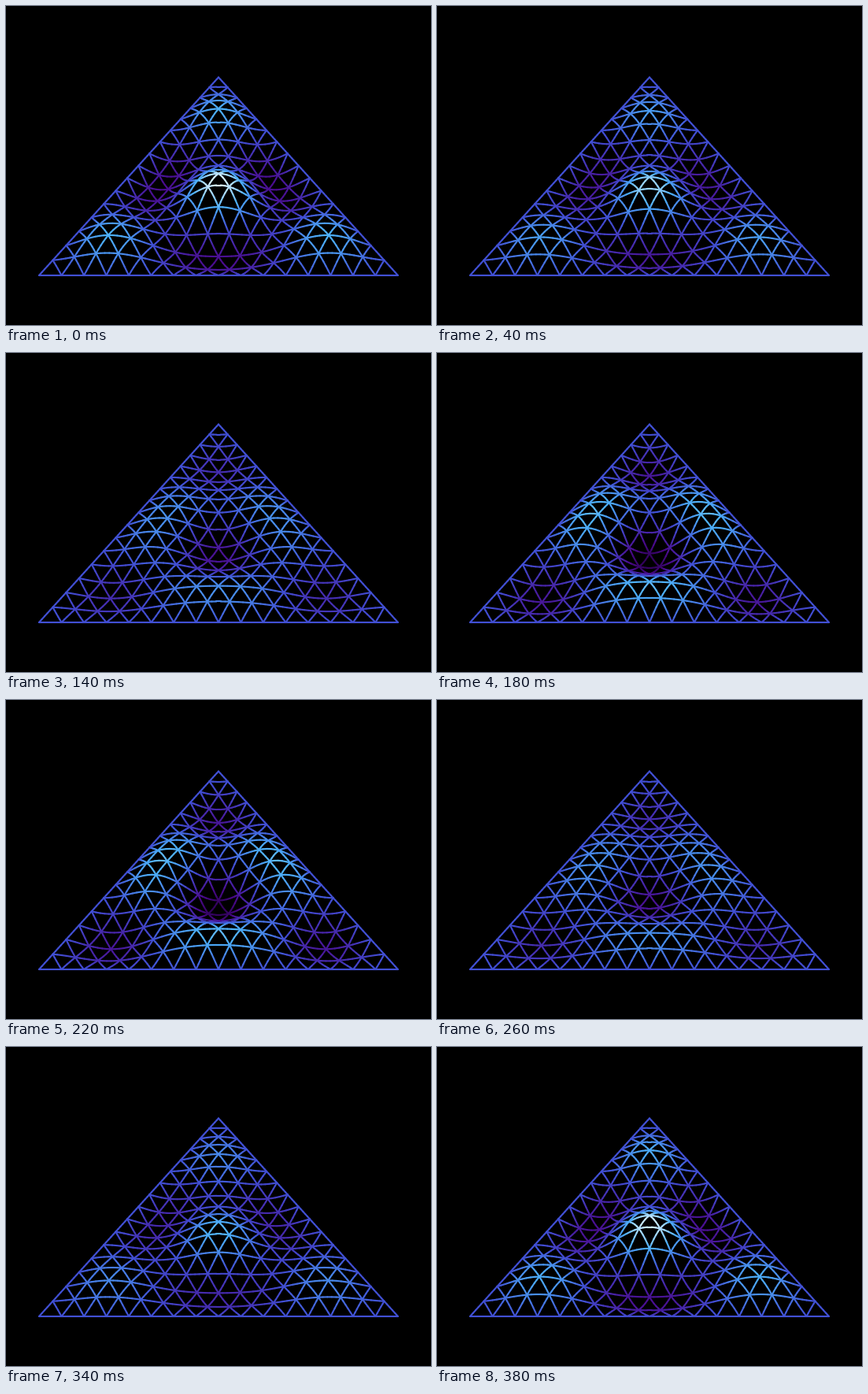
A matplotlib script for the animation above (400 ms loop, 540 by 405 pixels).

```python
import numpy as np
import matplotlib.pyplot as plt
from matplotlib.animation import FuncAnimation
from matplotlib.collections import LineCollection
from matplotlib.colors import LinearSegmentedColormap

W, H, DPI = 540, 405, 100
FRAMES, INTERVAL = 20, 20
ROWS, SUB = 16, 5          # mesh rows, curve pieces per mesh edge
LIFT = 0.515               # height of the wave, in mesh cells
PEAK = 1.5 * np.sqrt(3)    # value of the mode at the centre

deep_sea = LinearSegmentedColormap.from_list("deep_sea", [
    (0.00, (0.17, 0.00, 0.31)),
    (0.18, (0.29, 0.04, 0.55)),
    (0.50, (0.255, 0.31, 0.83)),
    (0.77, (0.30, 0.69, 0.98)),
    (1.00, (0.88, 0.96, 1.00)),
])


def mode(a, b, c):
    """Symmetric (1, 4) eigenmode of an equilateral triangular membrane."""
    t, d = np.pi * (1 - a), np.pi * (b - c)
    return (np.sin(t) * np.cos(3 * d) + np.sin(4 * t) * np.cos(2 * d)
            - np.sin(5 * t) * np.cos(d))


def project(a, b, c, h):
    """Perspective view from 45 degrees above; a is the far corner."""
    k = ROWS * (1 - a)
    depth = 0.0436 - 0.000532 * k - 0.000613 * h
    x = 270 + ROWS * (c - b) / 2 / depth
    y = 202.5 + (0.6111 * k - 4.883 - 0.7071 * h) / depth
    return np.stack([x, y], axis=-1)


def mesh():
    """Start and end points (barycentric) of all line pieces."""
    starts, ends = [], []
    for turn in range(3):
        for k in range(1, ROWS + 1):
            s = np.linspace(0, k / ROWS, k * SUB + 1)
            line = np.stack([np.full_like(s, 1 - k / ROWS), s, k / ROWS - s])
            line = np.roll(line, turn, axis=0)
            starts.append(line[:, :-1])
            ends.append(line[:, 1:])
    return np.hstack(starts), np.hstack(ends)


start, end = mesh()
f_start, f_end = mode(*start), mode(*end)

fig = plt.figure(figsize=(W / DPI, H / DPI), dpi=DPI, facecolor="black")
ax = fig.add_axes([0, 0, 1, 1])
ax.set_xlim(0, W)
ax.set_ylim(H, 0)
ax.axis("off")
wires = LineCollection([], linewidths=1.55, capstyle="round")
ax.add_collection(wires)


def draw(i):
    amp = np.cos(2 * np.pi * i / FRAMES)
    p = project(*start, LIFT * amp * f_start)
    q = project(*end, LIFT * amp * f_end)
    wires.set_segments(np.stack([p, q], axis=1))
    level = amp * (f_start + f_end) / 2
    wires.set_color(deep_sea(0.5 + level / (2 * PEAK)))
    return [wires]


anim = FuncAnimation(fig, draw, frames=FRAMES, interval=INTERVAL,
                     init_func=lambda: draw(0), repeat=True, repeat_delay=0)
plt.show()
```
